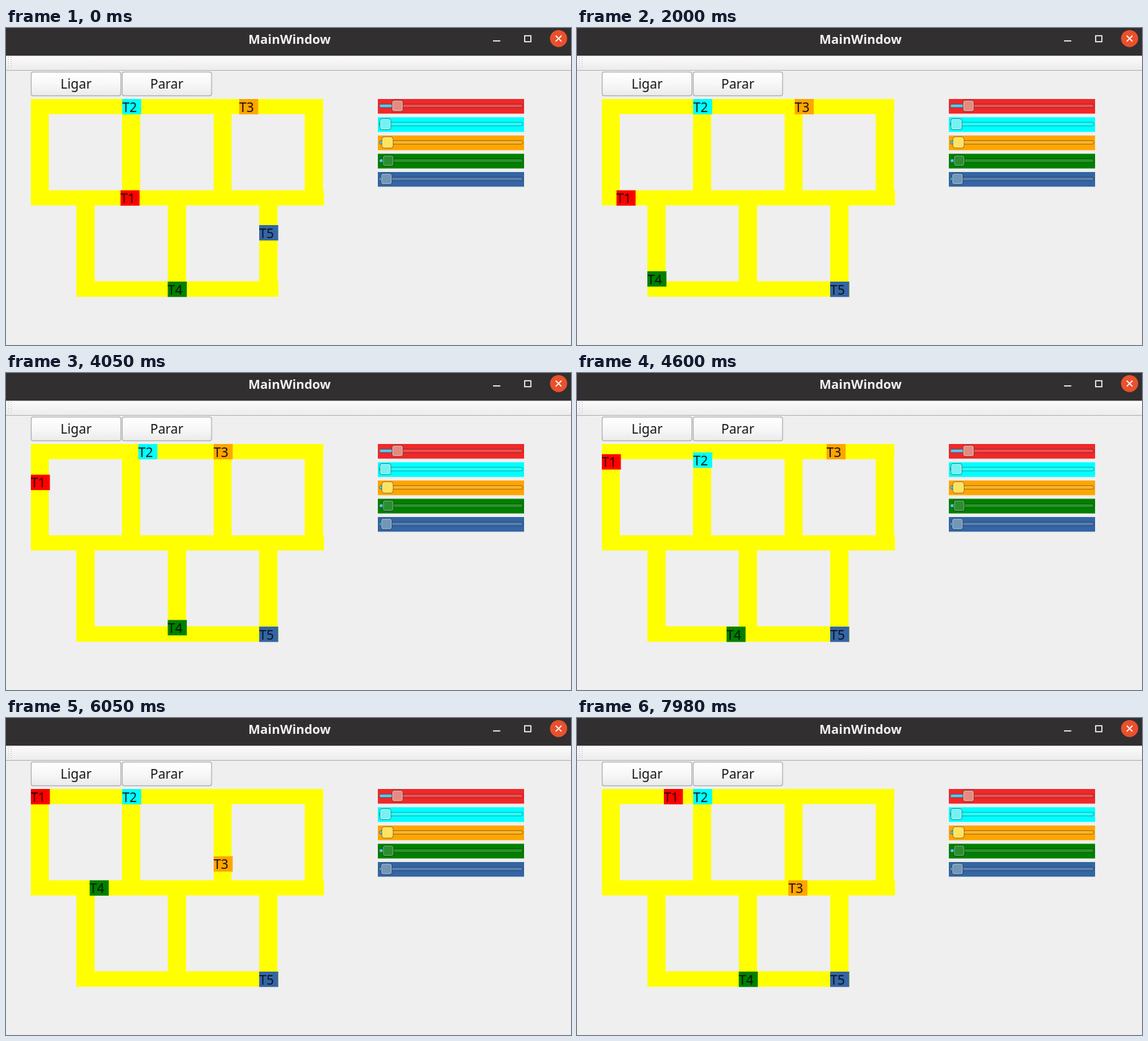
Animation, 819 px wide and 460 px high, one loop 8000 ms. Source, as an HTML page:

```html
<!DOCTYPE html>
<html lang="pt">
<head>
<meta charset="utf-8">
<title>MainWindow</title>
<style>
  html, body { margin: 0; width: 100%; height: 100%; overflow: hidden; background: #efefef; }
  svg { display: block; width: 100vw; height: 100vh; }
  text { font-family: "Noto Sans", "Open Sans", sans-serif; font-size: 19px; }
</style>
</head>
<body>
<svg id="stage" viewBox="0 0 819 460">
  <defs>
    <linearGradient id="bar" x2="0" y2="1">
      <stop stop-color="#fbfbfb"/><stop offset="1" stop-color="#ececec"/>
    </linearGradient>
    <linearGradient id="btn" x2="0" y2="1">
      <stop stop-color="#fff"/><stop offset=".5" stop-color="#f8f8f8"/><stop offset="1" stop-color="#eaeaea"/>
    </linearGradient>
  </defs>
  <rect width="819" height="460" fill="#efefef"/>

  <rect width="819" height="40.5" fill="#312f30"/>
  <text x="411" y="23" text-anchor="middle" fill="#f4f2f0" style="font-size:18.3px;font-weight:700">MainWindow</text>
  <path d="M706 18.7h10.5" stroke="#fff" stroke-width="1.6"/>
  <rect x="751.8" y="11.3" width="9" height="8.6" fill="none" stroke="#fff" stroke-width="1.5"/>
  <circle cx="801" cy="15.3" r="12.4" fill="#e9512d"/>
  <path d="M796.8 11.1l8.4 8.4m0-8.4l-8.4 8.4" stroke="#fff" stroke-width="1.6"/>

  <rect y="40.5" width="819" height="21" fill="url(#bar)"/>
  <path d="M0 61.5h819" stroke="#b4b4b4"/>
  <path d="M3.5 42v18M7.5 42v18" stroke="#b8b8b8" stroke-dasharray="1 2"/>

  <g fill="url(#btn)" stroke="#aeaeae" stroke-width="1.2">
    <rect x="36.5" y="63.8" width="130" height="34.6" rx="3"/>
    <rect x="168.5" y="63.8" width="129.5" height="34.6" rx="3"/>
  </g>
  <g text-anchor="middle" fill="#181818">
    <text x="101.5" y="88">Ligar</text>
    <text x="233" y="88">Parar</text>
  </g>

  <path fill="#ff0" d="M36 103h424v22H36z M36 235.5h425v22H36z M102 367.5h293v22.5H102z
    M36 103h26v154H36z M168 103h26.5v154H168z M301 103h26v154H301z M433 103h26.5v154H433z
    M102 236h26.5v154H102z M234.5 236h26.5v154H234.5z M367 236h26.5v154H367z"/>
  <g id="sliders"></g>
  <g id="trains"></g>
</svg>
<script>
const NS = 'http://www.w3.org/2000/svg';
const LOOP = 8000, STEP = 68.78, LEAD = 11.5;
const SIDE = 132.5;

function add(parent, tag, attrs, text) {
  const el = document.createElementNS(NS, tag);
  for (const k in attrs) el.setAttribute(k, attrs[k]);
  if (text) el.textContent = text;
  parent.appendChild(el);
  return el;
}

// keys: [time in ms, distance run clockwise from the track's top left corner]
const trains = [
  { x: 36, y: 103, color: '#f00', ink: '#2a0000',
    keys: [[0, 267.5], [2000, 376.5], [3160, 437], [4050, 485], [4883, 530], [6290, 530], [7980, 620]] },
  { x: 168.4, y: 103, color: '#0ff', ink: '#06201f',
    keys: [[4032, 0], [4622, 530]] },
  { x: 301, y: 103, color: '#ffa500', ink: '#1c1200',
    keys: [[0, 37], [2000, 546], [3160, 840.5], [4026, 1060], [4370, 1060], [5230, 1279.5], [6870, 1704], [7980, 1982.5]] },
  { x: 102, y: 235.5, color: '#008000', ink: '#001800',
    keys: [[1170, 265], [2000, 413.5], [3160, 623], [4050, 784], [4111, 795], [4510, 795],
           [5230, 924.5], [5770, 1027.5], [6870, 1229], [7395, 1325]] },
  { x: 234.5, y: 235.5, color: '#3465a4', ink: '#0a1420',
    keys: [[0, 183], [182, 265]] }
];

const sliders = [
  { color: '#ef2929', knob: '#e58a80', at: 567.5 },
  { color: '#00ffff', knob: '#74f2f2', at: 550 },
  { color: '#ffa500', knob: '#ffe25c', at: 553 },
  { color: '#008000', knob: '#2a8f2e', at: 554 },
  { color: '#3465a4', knob: '#7096b8', at: 551.5 }
];

const sliderLayer = document.getElementById('sliders');
sliders.forEach((s, i) => {
  const g = add(sliderLayer, 'g', { transform: `translate(0 ${103 + i * 26.5})` });
  add(g, 'rect', { x: 539, width: 212, height: 21.3, fill: s.color });
  add(g, 'rect', { x: 541.5, y: 7.5, width: 207.5, height: 5, rx: 2,
    fill: '#fff', 'fill-opacity': .16, stroke: '#000', 'stroke-opacity': .35 });
  add(g, 'rect', { x: 541.5, y: 7.8, width: s.at - 541.5, height: 4.4, rx: 1.5,
    fill: '#5cc8ec', stroke: '#1c5a78', 'stroke-opacity': .5, 'stroke-width': .8 });
  add(g, 'rect', { x: s.at - 8, y: 2, width: 16, height: 16, rx: 3,
    fill: s.knob, stroke: '#000', 'stroke-opacity': .38 });
  add(g, 'rect', { x: s.at - 6.8, y: 3.2, width: 13.6, height: 13.6, rx: 2,
    fill: 'none', stroke: '#fff', 'stroke-opacity': .3 });
});

const trainLayer = document.getElementById('trains');
trains.forEach((t, i) => {
  t.el = add(trainLayer, 'g', {});
  add(t.el, 'rect', { width: 27.6, height: 22.3, fill: t.color });
  add(t.el, 'text', { x: 0, y: 18.6, fill: t.ink }, 'T' + (i + 1));
});

function distance(keys, time) {
  if (time <= keys[0][0]) return keys[0][1];
  for (let i = 1; i < keys.length; i++) {
    const [t0, d0] = keys[i - 1], [t1, d1] = keys[i];
    if (time < t1) return d0 + (d1 - d0) * (time - t0) / (t1 - t0);
  }
  return keys[keys.length - 1][1];
}

function trackPoint(d) {
  d %= 4 * SIDE;
  const run = d % SIDE;
  return [[run, 0], [SIDE, run], [SIDE - run, SIDE], [0, SIDE - run]][Math.floor(d / SIDE)];
}

function render(ms) {
  const time = Math.floor((ms + LEAD) / STEP) * STEP;
  for (const t of trains) {
    const [dx, dy] = trackPoint(distance(t.keys, time));
    t.el.setAttribute('transform', `translate(${(t.x + dx).toFixed(1)} ${(t.y + dy).toFixed(1)})`);
  }
}

const start = performance.now();
function tick() {
  render((performance.now() - start) % LOOP);
  requestAnimationFrame(tick);
}
tick();
</script>
</body>
</html>
```
